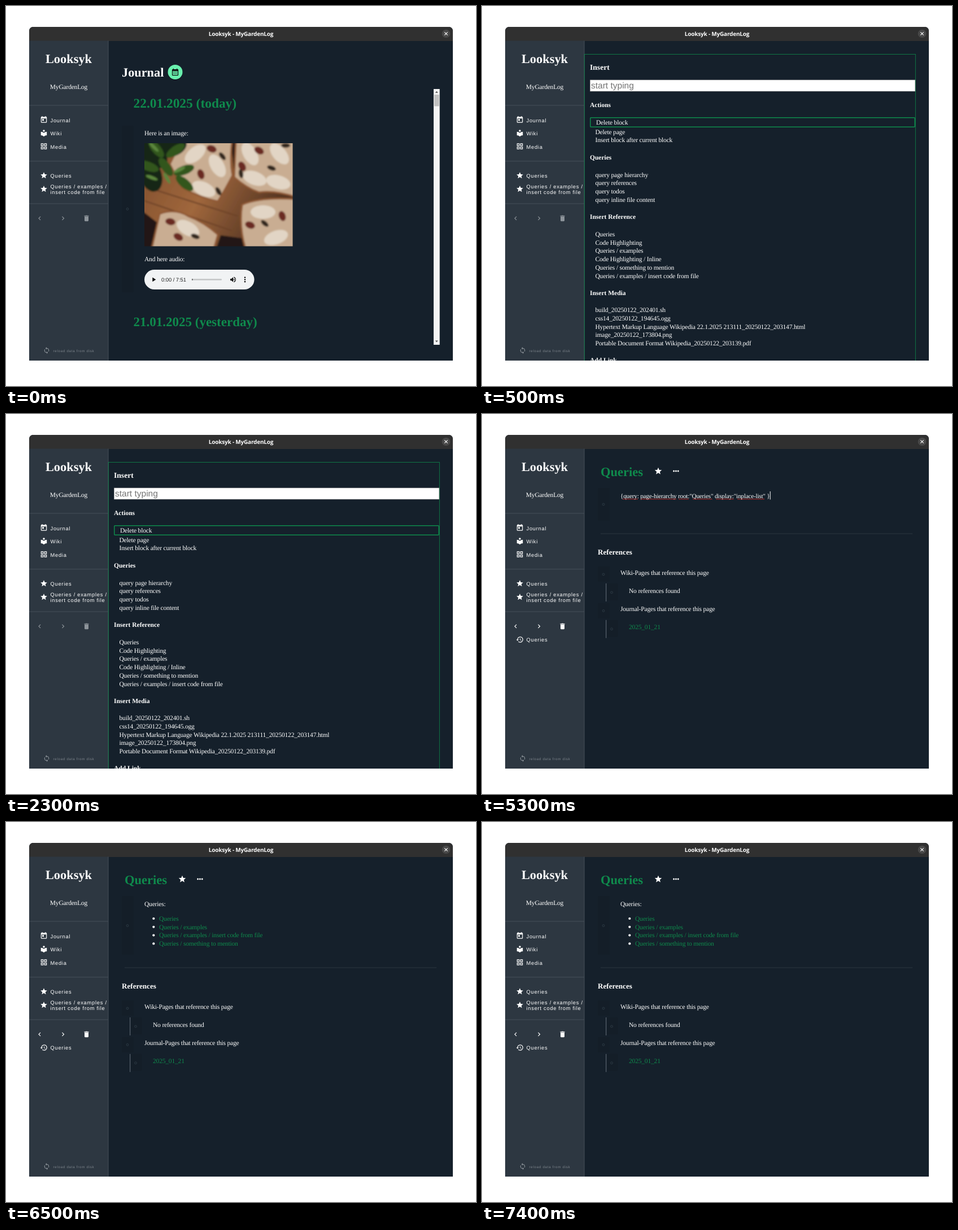
Animation, 832 px wide and 673 px high, one loop 8 s. Source, as an HTML page:

```html
<!DOCTYPE html>
<html lang="en">
<head>
<meta charset="utf-8">
<title>Note app demo</title>
<style>
html, body { margin: 0; height: 100%; overflow: hidden; background: #fff; }
svg { display: block; width: 100vw; height: 100vh; }
text { fill: #fff; white-space: pre; text-rendering: geometricPrecision; }
.body, .head { font-family: "Liberation Serif", serif; }
.body { font-size: 11.5px; letter-spacing: -.18px; }
.code { font-size: 11.2px; letter-spacing: -.2px; }
.head { font-weight: 700; }
.nav { font: 9.3px "Liberation Sans", sans-serif; letter-spacing: .75px; }
.reload { font: 6.2px "Liberation Sans", sans-serif; letter-spacing: .72px; fill: #7d858c; }
.hint, .clock { font-family: "Liberation Sans", sans-serif; }
.hint { font-size: 15.5px; fill: #757575; }
.clock { font-size: 9.3px; fill: #222; }
.title { font: 700 10px "Open Sans", sans-serif; letter-spacing: -.2px; }
.mid { text-anchor: middle; }
.green { fill: #0f8a4c; }
</style>
</head>
<body>
<svg id="stage" viewBox="0 0 832 673"></svg>
<script>
const GREEN = '#0f8a4c', LINE = '#47515b', GRAPH = 'MyGardenLog';

const ICONS = {
  today: 'M19 3h-1V1h-2v2H8V1H6v2H5c-1.1 0-2 .9-2 2v14c0 1.1.9 2 2 2h14c1.1 0 2-.9 2-2V5c0-1.1-.9-2-2-2zm0 16H5V8h14v11zM7 10h5v5H7z',
  reader: 'M12 11.55C9.64 9.35 6.48 8 3 8v11c3.48 0 6.64 1.35 9 3.55 2.36-2.19 5.52-3.55 9-3.55V8c-3.48 0-6.64 1.35-9 3.55zM12 8a3 3 0 1 0 0-6 3 3 0 0 0 0 6z',
  grid: 'M3 3v8h8V3zm6 6H5V5h4zM13 3v8h8V3zm6 6h-4V5h4zM3 13v8h8v-8zm6 6H5v-4h4zM13 13v8h8v-8zm6 6h-4v-4h4z',
  star: 'M12 17.27L18.18 21l-1.64-7.03L22 9.24l-7.19-.61L12 2 9.19 8.63 2 9.24l5.46 4.73L5.82 21z',
  left: 'M15.41 7.41L14 6l-6 6 6 6 1.41-1.41L10.83 12z',
  right: 'M10 6L8.59 7.41 13.17 12l-4.58 4.59L10 18l6-6z',
  trash: 'M6 19c0 1.1.9 2 2 2h8c1.1 0 2-.9 2-2V7H6zM19 4h-3.5l-1-1h-5l-1 1H5v2h14z',
  history: 'M13 3a9 9 0 0 0-9 9H1l4 4 4-4H6a7 7 0 1 1 2.06 4.94l-1.42 1.42A9 9 0 1 0 13 3zm-1 5v5l4.28 2.54.72-1.21-3.5-2.08V8z',
  sync: 'M12 4V1L8 5l4 4V6a6 6 0 0 1 5.3 8.8l1.46 1.46A8 8 0 0 0 12 4zm0 14a6 6 0 0 1-5.3-8.8L5.24 7.74A8 8 0 0 0 12 20v3l4-4-4-4z',
  calendar: 'M19 4h-1V2h-2v2H8V2H6v2H5a2 2 0 0 0-2 2v14a2 2 0 0 0 2 2h14a2 2 0 0 0 2-2V6a2 2 0 0 0-2-2zm0 16H5V9h14zM7 11h2v2H7zm4 0h2v2h-2zm4 0h2v2h-2zM7 15h2v2H7zm4 0h2v2h-2zm4 0h2v2h-2z',
  play: 'M8 5v14l11-7z',
  volume: 'M3 9v6h4l5 5V4L7 9zm13.5 3A4.5 4.5 0 0 0 14 7.97v8.05A4.5 4.5 0 0 0 16.5 12zM14 3.23v2.06a7 7 0 0 1 0 13.42v2.06a9 9 0 0 0 0-17.54z'
};

const text = (x, y, str, cls = 'body', size) =>
  `<text x="${x}" y="${y}" class="${cls}"${size ? ` style="font-size:${size}px"` : ''}>${str}</text>`;
const lines = (x, y, list, cls) => list.map((s, i) => text(x, y + i * 14.8, s, cls)).join('');
const rect = (x, y, w, h, fill, extra = '') =>
  `<rect x="${x}" y="${y}" width="${w}" height="${h}" fill="${fill}" ${extra}/>`;
const dot = (x, y, r, fill, extra = '') => `<circle cx="${x}" cy="${y}" r="${r}" fill="${fill}" ${extra}/>`;
const path = (d, fill, extra = '') => `<path d="${d}" fill="${fill}" ${extra}/>`;
const icon = (name, x, y, size = 14, fill = '#fff') =>
  path(ICONS[name], fill, `transform="translate(${x} ${y}) scale(${size / 24}) translate(-12 -12)"`);
const handle = (x, y, w, h, cx, cy) => rect(x, y, w, h, '#141e28', 'rx="2"') +
  dot(cx, cy, 1.9, 'none', 'stroke="#33404b" stroke-width=".8"');

function squiggle(x, end, y) {
  let d = `M${x} ${y}`;
  for (let i = 1; x + i * 1.5 <= end; i++) d += `L${x + i * 1.5} ${y + (i % 2 ? 1.3 : 0)}`;
  return path(d, 'none', 'stroke="#e0322c" stroke-width=".9"');
}

function frameAndSidebar() {
  const nav = [['today', 201.5, 'Journal'], ['reader', 225, 'Wiki'], ['grid', 248.5, 'Media'], ['star', 300, 'Queries']];
  return rect(41, 37, 750, 600, '#15202b', 'rx="7"') +
    path('M41 62V44a7 7 0 0 1 7-7h736a7 7 0 0 1 7 7v18z', '#303030') +
    text(416, 52.5, `Looksyk - ${GRAPH}`, 'title mid') +
    dot(779, 49, 7.3, '#484848') +
    path('M776.3 46.3l5.4 5.4m0-5.4l-5.4 5.4', 'none', 'stroke="#fff" stroke-width="1.1"') +
    rect(41, 61.5, 140, 567, '#2d3741') + rect(180.5, 61.5, 1, 567, LINE) +
    [176, 274.8, 350].map(y => rect(41, y - .5, 140, 1, LINE)).join('') +
    text(111, 101, 'Looksyk', 'head mid', 22.4) + text(111, 147, GRAPH, 'body mid') +
    nav.map(([name, y, label]) => icon(name, 67, y) + text(78.5, y + 4, label, 'nav')).join('') +
    icon('star', 67, 324) +
    text(78.5, 322.5, 'Queries / examples /', 'nav') + text(78.5, 332.5, 'insert code from file', 'nav') +
    icon('sync', 72, 610, 13, '#8d949a') + text(83.5, 613, 'reload data from disk', 'reload');
}

const tools = fill => icon('left', 59.5, 376, 14, fill) + icon('right', 101, 376, 14, fill) + icon('trash', 142.5, 376, 14, fill);

// Soft, simplified picture of pizza slices on a wooden board.
function photo() {
  const slices = [
    'M310 240L400 240Q396 275 401 300Q388 325 375 346Q345 340 312 322L290 280Z',
    'M407 240H512V338Q475 326 448 330Q425 322 404 303Z',
    'M418 352Q450 338 512 342V430H424Q412 390 418 352Z',
    'M272 368Q300 358 322 372Q350 382 375 405L368 430H258Z'
  ];
  const blobs = (fill, rx, ry, list) => list.map(([x, y, a]) =>
    `<ellipse rx="${rx}" ry="${ry}" fill="${fill}" transform="translate(${x} ${y}) rotate(${a})"/>`).join('');
  return `<g clip-path="url(#photo)"><g filter="url(#soft)">` +
    rect(240, 238, 275, 195, 'url(#wood)') +
    path('M240 362L270 385 258 430H240ZM372 430L380 406 424 412V430ZM398 238H410L404 300Z', '#211916') +
    path('M245 345L400 398M262 325L410 372', 'none', 'stroke="#6b4026" stroke-width="2"') +
    slices.map(d => path(d, '#c9ad92', 'stroke="#8f5730" stroke-width="3"')).join('') +
    blobs('#e2d5c5', 22, 12, [[335, 262, -40], [374, 283, 60], [350, 324, 25], [432, 262, 60], [482, 312, 15], [440, 305, 20], [484, 262, 50], [455, 365, 0], [478, 410, -20], [322, 394, 30]]) +
    blobs('#6b2a22', 9, 6, [[364, 253, 20], [345, 298, 70], [448, 256, 30], [418, 284, 60], [489, 372, 70], [432, 388, 20], [305, 409, 30], [291, 382, 10]]) +
    blobs('#33261c', 8, 4, [[383, 266, 50], [416, 297, 80], [470, 287, 20], [458, 385, 40], [335, 408, 20], [376, 328, 60], [495, 247, 0]]) +
    blobs('#172513', 32, 20, [[258, 262, 40], [288, 248, -10], [255, 298, 70]]) +
    blobs('#31561f', 19, 8, [[266, 253, 50], [300, 256, -35], [252, 284, 20], [283, 285, 55], [315, 291, -20], [316, 314, 40]]) +
    blobs('#5b873c', 11, 3, [[262, 250, 45], [307, 290, -25], [285, 305, 60], [258, 304, 20]]) +
    '</g></g>';
}

function journal() {
  return tools('#8d949a') + text(205, 125, 'Journal', 'head', 22.3) +
    dot(299.5, 118.5, 13, '#0b1218', 'opacity=".6"') + dot(299.5, 117, 13, '#69f0ae') +
    icon('calendar', 299.5, 117, 15, '#111') +
    text(225.5, 180, '22.01.2025 (today)', 'head green', 23.4) +
    handle(205, 212, 21, 295, 215, 359.5) +
    text(245, 228.5, 'Here is an image:') + photo() + text(245, 451.5, 'And here audio:') +
    rect(245, 467, 194.5, 35, '#f1f3f4', 'rx="17.5"') +
    icon('play', 261.5, 484.5, 13, '#000') + text(275, 488, '0:00 / 7:51', 'clock') +
    rect(329, 483.2, 53, 2.6, '#c3c5c6', 'rx="1.3"') + rect(329, 483.2, 1.5, 2.6, '#555') +
    icon('volume', 402, 484.5, 13, '#000') +
    [480.8, 484.5, 488.2].map(y => dot(423, y, 1.2, '#000')).join('') +
    text(225.5, 567, '21.01.2025 (yesterday)', 'head green', 23) +
    rect(757, 147, 10.7, 453, '#f4f4f4') + rect(758, 157, 8.7, 20.5, '#c1c1c1') +
    path('M759.8 153.8h5l-2.5-3zM759.8 592.6h5l-2.5 3z', '#505050');
}

function insertDialog() {
  return tools('#8d949a') +
    rect(181.3, 85.5, 586, 560, 'none', `stroke="${GREEN}" stroke-width=".8"`) +
    text(191, 113, 'Insert', 'head', 13.6) +
    rect(191.3, 131, 575.5, 20, '#fff', 'stroke="#999" stroke-width=".6"') +
    text(193, 146.2, 'start typing', 'hint') +
    rect(191.8, 197.8, 574.4, 16.4, 'none', `stroke="${GREEN}" stroke-width="1.5" rx="1"`) +
    text(202, 210, 'Delete block') +
    lines(200.5, 226.6, ['Delete page', 'Insert block after current block']) +
    lines(200.5, 302.6, ['query page hierarchy', 'query references', 'query todos', 'query inline file content']) +
    lines(200.5, 407.7, ['Queries', 'Code Highlighting', 'Queries / examples', 'Code Highlighting / Inline',
      'Queries / something to mention', 'Queries / examples / insert code from file']) +
    lines(200.5, 542, ['build_20250122_202401.sh', 'css14_20250122_194645.ogg',
      'Hypertext Markup Language Wikipedia 22.1.2025 213111_20250122_203147.html',
      'image_20250122_173804.png', 'Portable Document Format Wikipedia_20250122_203139.pdf']) +
    [[178.5, 'Actions'], [271.5, 'Queries'], [377, 'Insert Reference'], [511.5, 'Insert Media'], [631, 'Add Link']]
      .map(([y, s]) => text(191, y, s, 'head', 11.5)).join('');
}

function queriesPage(content, shift) {
  const branch = y => rect(219.2, y, 1, 32, '#66717a') + handle(221.5, y, 19, 30, 229.5, y + 16);
  return tools('#fff') + icon('history', 67, 399.5) + text(78.5, 403, 'Queries', 'nav') +
    text(210, 109.5, 'Queries', 'head green', 22.5) + icon('star', 312, 101, 15) +
    [339.6, 343.4, 347.2].map(x => dot(x, 101, 1.5, '#fff')).join('') + content +
    `<g transform="translate(0 ${shift})">` +
    rect(210, 211.5, 552, 1, '#2d3741') + text(205, 249, 'References', 'head', 13.1) +
    handle(205, 270, 21, 27, 215, 284) + text(245, 284.5, 'Wiki-Pages that reference this page') +
    branch(300) + text(260, 316.7, 'No references found') +
    handle(205, 335, 21, 27, 215, 348.5) + text(245, 349, 'Journal-Pages that reference this page') +
    branch(364.8) + text(260, 381.2, '2025_01_21', 'body green') + '</g>';
}

const editing = handle(205, 131, 21, 58, 215, 160) +
  text(245, 148.5, '{query: page-hierarchy root:"Queries" display:"inplace-list" }', 'body code') +
  [[249, 276], [281, 344], [348, 367], [373, 408], [414, 446], [452, 500]]
    .map(([a, b]) => squiggle(a, b, 150)).join('') +
  rect(509.7, 137, 1, 14.5, '#fff');

const result = handle(205, 131, 21, 104, 215, 183.5) + text(245, 148.5, 'Queries:') +
  [0, 1, 2, 3].map(i => dot(261.3, 171 + i * 14.8, 2.1, '#fff')).join('') +
  lines(271, 174.7, ['Queries', 'Queries / examples', 'Queries / examples / insert code from file',
    'Queries / something to mention'], 'body green');

const scenes = [[0, journal()], [500, insertDialog()], [3500, queriesPage(editing, 0)], [6500, queriesPage(result, 46)]];

const stage = document.getElementById('stage');
stage.innerHTML = `<defs>
  <clipPath id="window"><rect x="41" y="37" width="750" height="591"/></clipPath>
  <clipPath id="photo"><rect x="245" y="243" width="262.5" height="182.5"/></clipPath>
  <filter id="soft"><feGaussianBlur stdDeviation="1.6"/></filter>
  <linearGradient id="wood" x2="1" y2=".4"><stop stop-color="#7d4c2c"/><stop offset=".5" stop-color="#a0673c"/><stop offset="1" stop-color="#4d3020"/></linearGradient>
  </defs><g clip-path="url(#window)">${frameAndSidebar()}${scenes.map(s => `<g class="scene">${s[1]}</g>`).join('')}</g>`;

const groups = [...stage.querySelectorAll('.scene')];
const began = performance.now();
function draw() {
  const t = (performance.now() - began) % 8000;
  const current = scenes.findLastIndex(([start]) => t >= start);
  groups.forEach((g, i) => g.style.display = i === current ? '' : 'none');
  requestAnimationFrame(draw);
}
draw();
</script>
</body>
</html>
```
